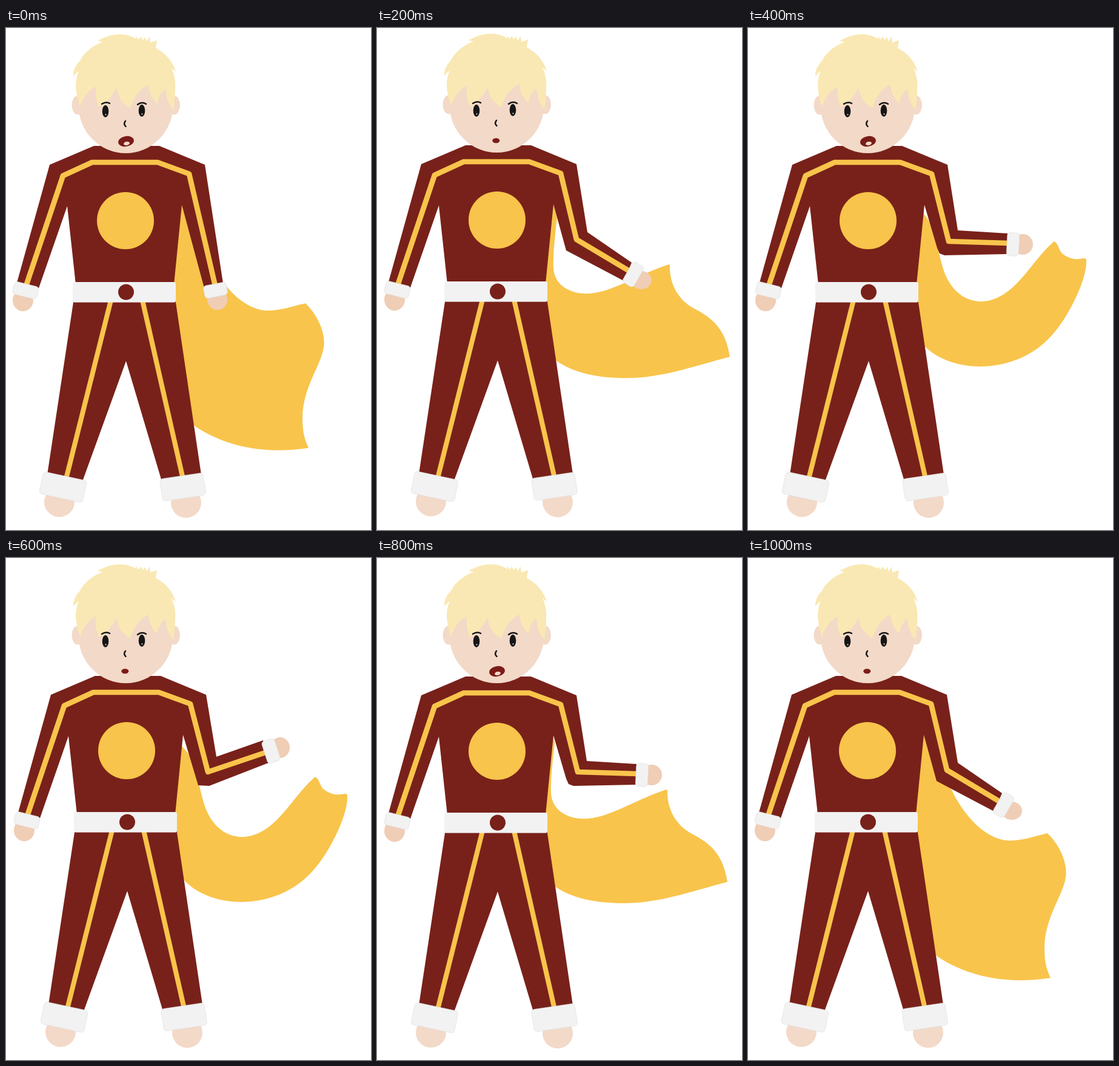
These frames come from a looping animation (602 by 826 pixels, 1200 ms). An HTML page with a canvas:

```html
<!DOCTYPE html>
<html lang="en">
<head>
<meta charset="utf-8">
<title>Caped hero</title>
<style>
html, body { margin: 0; width: 100%; height: 100%; overflow: hidden; background: #fff; }
canvas { display: block; }
</style>
</head>
<body>
<canvas id="stage" width="602" height="826"></canvas>
<script>
const ctx = document.getElementById('stage').getContext('2d');
const STEP = 200;
const RED = '#78211a', GOLD = '#f8c44b', WHITE = '#f2f2f2';
const SKIN = '#f3d9c8', HAND = '#f0cdb5', HAIR = '#f9e8b3', INK = '#161616';

const capes = {
  hang: new Path2D('M286 285L302 310L335 380C355 422 390 463 430 465C455 465 470 458 494 453C520 478 527 510 524 525C520 555 490 590 489 640C489 665 492 675 499 691C440 700 370 695 310 654L260 500Z'),
  flare: new Path2D('M286 285L292 291L297 312C294 340 290 370 291 395C293 425 320 437 345 437C385 437 420 410 481 389L483 390C482 425 500 448 520 460C560 480 575 500 582 541C520 557 470 576 410 576C365 576 325 568 295 547L260 480Z'),
  swoop: new Path2D('M280 295L289 305C310 325 312 370 325 405C340 440 365 450 385 450C440 448 465 385 505 351C512 355 513 366 518 371C530 380 540 382 553 379Q558 378 558 384C559 414 526 484 492 515C465 541 425 557 383 557C340 557 305 540 288 520L260 480Z')
};

// edge: sleeve outline from shoulder to armpit; cuff: x, y, w, h, degrees
const arms = {
  down: { edge: [358, 420, 327, 428], stripe: [345, 424], cuff: [345.5, 431.5, 38, 21, -11], hand: [348.5, 447, 16.5, 17] },
  low: { edge: [346, 337, 419, 387, 406, 417, 311, 367], stripe: [328, 349, 417, 402], cuff: [421.5, 406.5, 21, 39, 30], hand: [435, 416, 17, 15] },
  mid: { edge: [345, 333, 427, 338, 426, 372, 323, 374, 315, 371, 311, 362], stripe: [330, 351, 427, 354], cuff: [436, 356, 20, 38, 3], hand: [452, 356, 17, 17] },
  high: { edge: [345, 327, 422, 300, 431, 337, 333, 375, 315, 374], stripe: [331, 352, 426, 320], cuff: [435, 317.5, 22, 38, -18], hand: [450, 312, 16, 17] }
};

const poses = [
  { arm: 'down', body: [0, 0], cape: 'hang', at: [0, 0], open: true },
  { arm: 'low', body: [1, -1], cape: 'flare', at: [0, 0], lift: -1 },
  { arm: 'mid', body: [1, 0], cape: 'swoop', at: [0, 0], open: true },
  { arm: 'high', body: [2, 0], cape: 'swoop', at: [5, 9] },
  { arm: 'mid', body: [1, 1], cape: 'flare', at: [-4, -8], open: true },
  { arm: 'low', body: [0, 0], cape: 'hang', at: [0, 0] }
];

const hair = new Path2D('M122 130Q116 112 115 96Q115 82 120 71Q115 74 111 80Q110 66 122 54Q132 34 159 23L151 21Q187 1 215 18L214 13L219 19L222 14L226 20L229 15L232 22L237 14L238 24L249 20L247 33Q272 46 280 72L273 66Q281 82 279 105Q278 125 276 135Q264 121 263 100Q250 110 250 125Q236 112 235 93Q213 104 205 132Q184 120 183 98Q168 124 153 130Q146 115 148 96Q129 107 122 130Z');

function line(points) {
  ctx.beginPath();
  for (let i = 0; i < points.length; i += 2) ctx.lineTo(points[i], points[i + 1]);
}

function shape(points, color) {
  line(points);
  ctx.fillStyle = color;
  ctx.fill();
}

function stripe(points, width) {
  line(points);
  ctx.strokeStyle = GOLD;
  ctx.lineWidth = width;
  ctx.stroke();
}

function oval(x, y, rx, ry, color, deg = 0) {
  ctx.beginPath();
  ctx.ellipse(x, y, rx, ry, deg * Math.PI / 180, 0, Math.PI * 2);
  ctx.fillStyle = color;
  ctx.fill();
}

function cuff(x, y, w, h, deg) {
  ctx.save();
  ctx.translate(x, y);
  ctx.rotate(deg * Math.PI / 180);
  ctx.beginPath();
  ctx.roundRect(-w / 2, -h / 2, w, h, 5);
  ctx.fillStyle = WHITE;
  ctx.fill();
  ctx.strokeStyle = '#dedede';
  ctx.lineWidth = 0.6;
  ctx.stroke();
  ctx.restore();
}

function curve(x1, y1, cx, cy, x2, y2) {
  ctx.beginPath();
  ctx.moveTo(x1, y1);
  ctx.quadraticCurveTo(cx, cy, x2, y2);
  ctx.strokeStyle = INK;
  ctx.lineWidth = 2.5;
  ctx.stroke();
}

function at([x, y], draw) {
  ctx.save();
  ctx.translate(x, y);
  draw();
  ctx.restore();
}

function drawBody(arm) {
  oval(88, 780, 25, 24.5, SKIN);
  oval(297, 781, 25, 25, SKIN);
  oval(28, 448, 17, 18, HAND);
  oval(...arm.hand, HAND);

  shape([112, 445, 68, 735, 126, 746, 198, 548, 257, 746, 322, 735, 279, 445], RED);
  stripe([173, 448, 99, 742], 8);
  stripe([225, 448, 292, 742], 8);
  shape([253, 194, 328, 225, ...arm.edge, 290, 291, 277, 422,
    115, 422, 101, 293, 54, 428, 18, 419, 72, 225, 145, 194], RED);
  stripe([33.5, 423, 94, 243, 142, 221, 250, 221, 302, 240, ...arm.stripe], 8.7);

  ctx.beginPath();
  ctx.roundRect(110, 418, 170, 33.5, 3);
  ctx.fillStyle = WHITE;
  ctx.fill();
  oval(197, 317, 47, 47, GOLD);
  oval(198, 434.5, 13, 13, RED);

  cuff(32.5, 431.8, 41, 21, 14);
  cuff(...arm.cuff);
  cuff(94, 755.5, 73, 37, 12);
  cuff(291.7, 755.3, 72, 37, -8.5);
}

function drawHead(open) {
  oval(118, 127, 9.5, 15.5, SKIN);
  oval(277.5, 127, 9.5, 15.5, SKIN);
  oval(197.5, 127, 78, 79, SKIN);
  ctx.fillStyle = HAIR;
  ctx.fill(hair);

  for (const [x, y] of [[164, 137], [224, 136]]) {
    oval(x, y, 5.3, 10, INK);
    oval(x + 0.5, y + 5.5, 1, 1.1, '#fff');
  }
  curve(158, 125, 165, 120.5, 171, 124);
  curve(217, 126, 224, 120.5, 231, 125);
  curve(197, 153, 193, 158, 197.5, 162);

  if (open) {
    oval(198, 186.5, 13, 8.5, '#7a1c18', -10);
    oval(199, 190, 5, 3, SKIN, -12);
  } else {
    oval(196.3, 186.3, 6, 4, '#7a1c18');
  }
}

function render(now) {
  const pose = poses[Math.floor(now / STEP) % poses.length];
  ctx.fillStyle = '#fff';
  ctx.fillRect(0, 0, 602, 826);
  ctx.lineJoin = 'round';
  ctx.lineCap = 'butt';
  at(pose.at, () => {
    ctx.fillStyle = GOLD;
    ctx.fill(capes[pose.cape]);
  });
  at(pose.body, () => drawBody(arms[pose.arm]));
  ctx.lineCap = 'round';
  at([0, pose.lift || 0], () => drawHead(pose.open));
}

const start = performance.now();
function tick() {
  render(performance.now() - start);
  requestAnimationFrame(tick);
}
tick();
</script>
</body>
</html>
```
